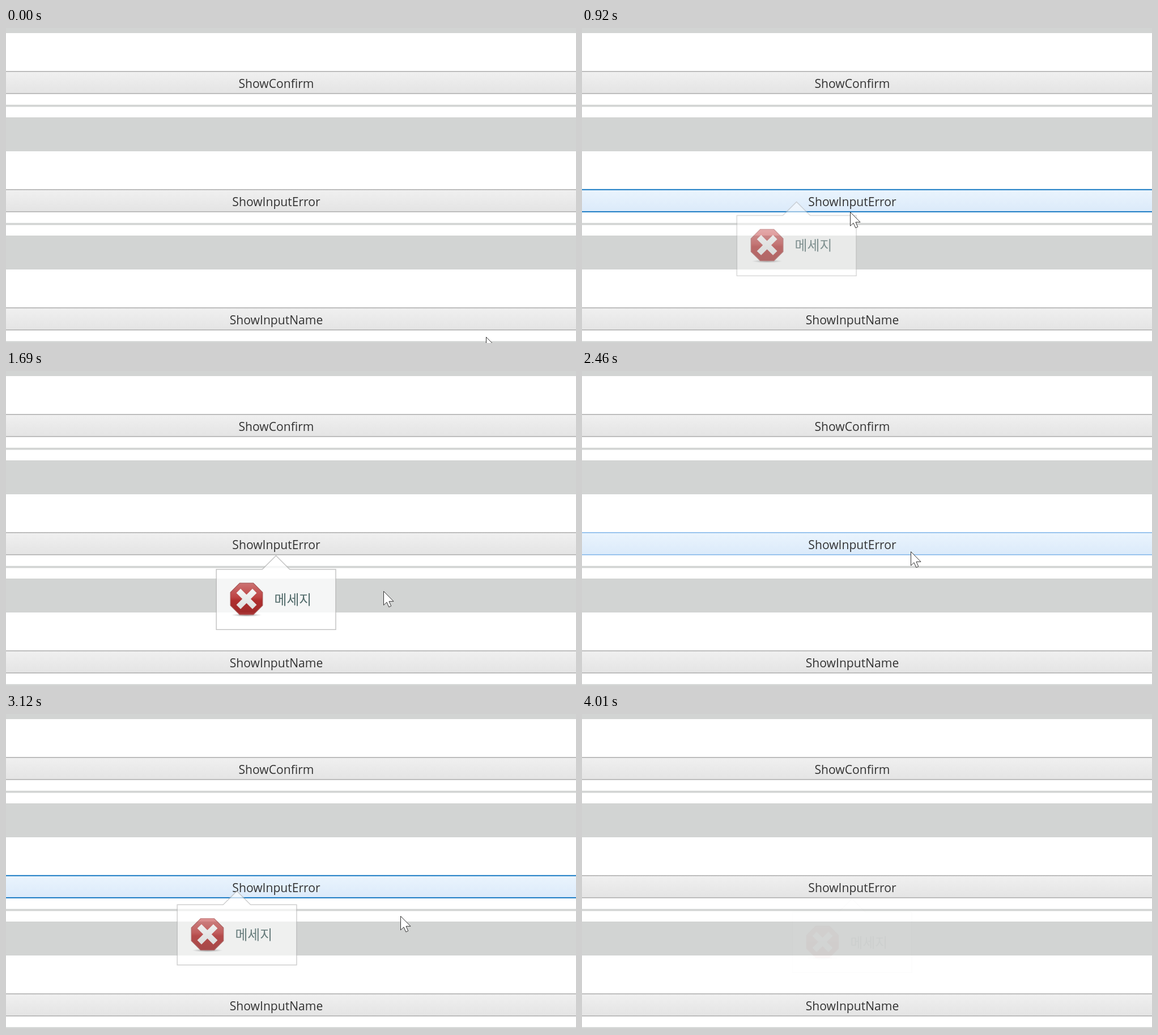
Write an HTML page that moves like this. It is 1006 by 557 pixels and loops after 4410 ms.

```html
<!DOCTYPE html>
<html lang="ko">
<head>
<meta charset="utf-8">
<title>Popup message</title>
<style>
  html, body { margin: 0; width: 100%; height: 100%; overflow: hidden; background: #fff; }
  svg { display: block; width: 100%; height: 100%; }
  .label { font: 21.1px "Open Sans", "Noto Sans", sans-serif; fill: #333; text-anchor: middle; }
  .message { font: 300 23.8px "Noto Sans CJK KR", "Noto Sans CJK", sans-serif; fill: #2f4f4f; }
  .button { fill: url(#plain); stroke: #acacac; stroke-width: 1.5; }
  .hover { fill: url(#light); stroke: #7eb4ea; }
  .focus { stroke: #1a7bc4; stroke-width: 2; }
</style>
</head>
<body>
<svg viewBox="0 0 1006 557" preserveAspectRatio="none">
  <defs>
    <linearGradient id="plain" x2="0" y2="1">
      <stop stop-color="#f0f0f0"/><stop offset="1" stop-color="#e4e4e4"/>
    </linearGradient>
    <linearGradient id="light" x2="0" y2="1">
      <stop stop-color="#eaf4fd"/><stop offset="1" stop-color="#dbeafa"/>
    </linearGradient>
    <linearGradient id="red" x2="0" y2="1">
      <stop stop-color="#cb5a5a"/><stop offset=".45" stop-color="#b82020"/>
      <stop offset=".55" stop-color="#a60404"/><stop offset="1" stop-color="#900000"/>
    </linearGradient>
    <linearGradient id="silver" gradientUnits="userSpaceOnUse" x1="0" y1="386" x2="0" y2="420">
      <stop stop-color="#fff"/><stop offset="1" stop-color="#e2e2e2"/>
    </linearGradient>
    <radialGradient id="shade">
      <stop stop-color="#000" stop-opacity=".5"/><stop offset="1" stop-color="#000" stop-opacity="0"/>
    </radialGradient>
  </defs>

  <g id="page"></g>

  <g id="popup" opacity="0">
    <path d="M371.2 350.7H452.3L476.5 326.5L500.7 350.7H582V457.3H371.2Z" fill="#fff" stroke="#b6b6b6" stroke-width="1.5"/>
    <ellipse cx="424.5" cy="431.5" rx="27" ry="3" fill="url(#shade)"/>
    <path d="M412.5 375.2H436.5L452.8 391.5V414.5L436.5 430.8H412.5L396.2 414.5V391.5Z" fill="url(#red)" stroke="#9a3030" stroke-width="1.2"/>
    <path d="M410.3 388.8L438.7 417.2M438.7 388.8L410.3 417.2" stroke="url(#silver)" stroke-width="10.5"/>
    <text class="message" x="473.5" y="412.5">메세지</text>
  </g>

  <path id="cursor" d="M.5 .5V25L6 19.8L9.8 28.4L13.8 26.6L10 18.3H18Z" fill="#fff" stroke="#333"/>
</svg>
<script>
const LOOP = 4410, TICK = 77, LEAD = 7;
const byId = id => document.getElementById(id);

// Pointer tip waypoints, joined by straight moves
const path = [
  { t: 0, x: 847, y: 546 }, { t: 290, x: 455, y: 309 }, { t: 740, x: 455, y: 309 },
  { t: 924, x: 473, y: 325 }, { t: 1694, x: 666, y: 389 }, { t: 2156, x: 590, y: 335 },
  { t: 2464, x: 580, y: 319 }, { t: 2930, x: 580, y: 319 }, { t: 3080, x: 696, y: 357 },
  { t: 3465, x: 780, y: 384 }, { t: 3690, x: 780, y: 384 }, { t: 4004, x: 1010, y: 600 }
];

const popups = [
  { press: 500, open: 842, length: 273, close: 1578 },
  { press: 2840, open: 2842, length: 577, close: 3644 }
];
const FADE = 400;

const ramp = (t, from, length) => Math.min(1, Math.max(0, (t - from) / length));
const easeOut = k => 1 - (1 - k) ** 2;
const smooth = k => k * k * (3 - 2 * k);

function pointerAt(t) {
  const i = path.findLastIndex(p => p.t <= t);
  const a = path[i], b = path[i + 1] ?? a;
  const k = ramp(t, a.t, b.t - a.t || 1);
  return { x: a.x + (b.x - a.x) * k, y: a.y + (b.y - a.y) * k };
}

const band = (y, height) => `<rect y="${y}" width="1006" height="${height}" fill="#d2d4d3"/>`;
byId("page").innerHTML = band(0, 9) + ["ShowConfirm", "ShowInputError", "ShowInputName"].map((name, i) => {
  const y = 76 + i * 209;
  return `<rect class="button" x="-5" y="${y + .8}" width="1016" height="39.1"/>
    <text class="label" x="477" y="${y + 30}">${name}</text>` +
    band(y + 59.7, 3.7) + band(y + 82, 60);
}).join("");

const button = document.querySelectorAll(".button")[1];
const start = performance.now();

function draw() {
  const now = Math.max(0, performance.now() - start) % LOOP;
  const t = Math.floor((now + LEAD) / TICK) * TICK;
  const { x, y } = pointerAt(t);
  const { press, open, length, close } = popups.findLast(p => p.press <= t) ?? popups[0];
  const shown = easeOut(ramp(t, open, length));
  const opacity = shown * (1 - smooth(ramp(t, close, FADE)));

  // The button stays lit until the popup is almost in place
  const hover = y > 285 && y < 325.5 || shown > 0 && shown < .8;
  const focus = t >= press && t < close;

  button.setAttribute("class", `button ${hover ? "hover" : ""} ${focus ? "focus" : ""}`);
  byId("cursor").setAttribute("transform", `translate(${x} ${y})`);
  byId("popup").setAttribute("transform", `translate(${-200 * (1 - shown)} ${-39 * (1 - shown)})`);
  byId("popup").setAttribute("opacity", opacity);
  requestAnimationFrame(draw);
}
draw();
</script>
</body>
</html>
```
